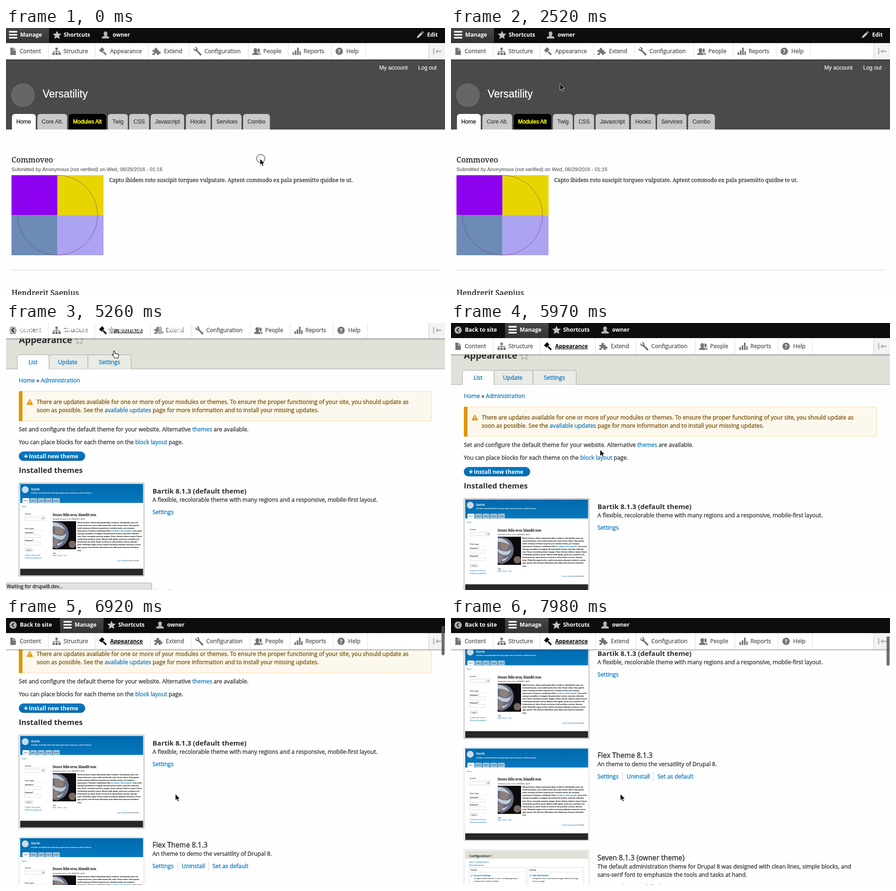
These frames come from a looping animation (959x584 px, 8000 ms). An HTML page:

```html
<!DOCTYPE html>
<html lang="en">
<head>
<meta charset="utf-8">
<title>Theme switch</title>
<style>
html, body { margin: 0; width: 100%; height: 100%; overflow: hidden; background: #fefefe; }
svg { display: block; width: 100%; height: 100%; font: 12.45px "Open Sans", "Noto Sans", sans-serif; color: #2e2e2e; fill: currentColor; }
text { white-space: pre; stroke: currentColor; stroke-width: .024em; }
tspan { stroke: currentColor; }
.b { font-weight: 700; font-size: 12px; stroke: none; }
.w { color: #fff; }
.l { color: #0072bb; }
.g { color: #505050; }
.u { text-decoration: underline; color: #000; }
.h { font-family: "Liberation Sans", Arial, sans-serif; font-size: 12.1px; stroke-width: .012em; }
.s { font-family: "Noto Serif", serif; color: #1c1c1c; stroke-width: .015em; }
.heavy { stroke-width: .05em; }
.warn { color: #734c00; }
</style>
</head>
<body>
<svg viewBox="0 0 959 584" xmlns="http://www.w3.org/2000/svg"></svg>
<script>
const ICON = {
  file: 'M0 1h6v6h6v10H0zM7 1l5 5H7z',
  tree: 'M6.5 1h5v5h-5zM0 12h5v5H0zM6.5 12h5v5h-5zM13 12h5v5h-5zM8.3 6h1.4v6H8.3zM2 8.5h14V12h-1.4v-2H3.4v2H2z',
  brush: 'M0 7 7 0l5 5-6 7zM10 8.5l7 6.5-2 3-7-7z',
  puzzle: 'M0 6h5a3 3 0 1 1 5 0h4v4a2.5 2.5 0 1 1 0 4v3H9.5a2.5 2.5 0 1 0-4 0H0v-4a2 2 0 1 0 0-3z',
  wrench: 'M1 2l4 4 2-2-4-4a5.5 5.5 0 0 1 6.5 7l8 7.5a2 2 0 0 1-3 3L7 9A5.5 5.5 0 0 1 1 2z',
  person: 'M6 9.5a4 4.8 0 1 1 6 0v2l5 2V17H1v-3.5l5-2z',
  people: 'M4 10a4 4.8 0 1 1 6 0v2l4 2v3H0v-3l4-2zM12 3a3.5 4 0 0 1 2 8l4 2v4h-2.5v-4L12 11z',
  bars: 'M0 11h3.5v6H0zM5 7h3.5v10H5zM10 1h3.5v16H10zM15 9h3v8h-3z',
  disc: 'M8.5 1a8 8 0 1 0 .01 0z',
  star: 'M9 0l2.7 6.2 6.8.6-5.1 4.5 1.5 6.7L9 14.5 3.1 18l1.5-6.7L-.5 6.8l6.8-.6z',
  pencil: 'M1 17l1.5-5 9-9L15 6.5l-9 9zM12.5 2 14.2.3l3.5 3.5L16 5.5z'
};

// markup helpers
const text = (x, y, s, cls = '', size) =>
  `<text x="${x}" y="${y}" class="${cls}"${size ? ` style="font-size:${size}px"` : ''}>${s}</text>`;
const box = (x, y, w, h, fill, more = '') =>
  `<rect x="${x}" y="${y}" width="${w}" height="${h}" fill="${fill}" ${more}/>`;
const path = (d, fill, more = '') => `<path d="${d}" fill="${fill}" ${more}/>`;
const icon = (name, x, y, fill, scale = 1) =>
  path(ICON[name], fill, `transform="translate(${x} ${y}) scale(${scale})"`);
const tint = (color, s) => `<g style="color:${color}">${s}</g>`;
const link = s => `<tspan class="l" fill="currentColor">${s}</tspan>`;
const group = (id, s, more = '') => `<g id="${id}" ${more}>${s}</g>`;
const tabPath = (x, y, w, h, r) =>
  `M${x} ${y + h}v${r - h}q0 ${-r} ${r} ${-r}h${w - 2 * r}q${r} 0 ${r} ${r}v${h - r}`;

// label, text x, icon, icon x, right edge
const MENU = [
  ['Content', 30, 'file', 9.5, 92], ['Structure', 125.5, 'tree', 101.5, 194],
  ['Appearance', 227.5, 'brush', 203, 311], ['Extend', 345, 'puzzle', 320, 400],
  ['Configuration', 433.5, 'wrench', 409, 529], ['People', 562, 'people', 538, 616],
  ['Reports', 650, 'bars', 626, 710], ['Help', 743.5, 'disc', 719.5, 785]
];

function tray(active) {
  let s = box(0, 33, 959, 36, '#fff') + box(923, 33, 36, 36, '#f3f3f3') +
    box(923, 33, 1, 36, '#ccc') +
    path('M933 44h2.5v14h-2.5zM938 51l5-5v3.5h8v3h-8V56z', '#b4b4b4') +
    box(0, 68.5, 959, 1, '#000', 'opacity=".4"') + box(0, 69.5, 959, 2, '#000', 'opacity=".14"');
  MENU.forEach(([label, x, name, ix, edge], i) => {
    const dx = active && i > 2 ? 4 : 0, on = active && i == 2;
    s += icon(name, ix + dx, 42, on ? '#000' : '#757575') +
      text(x + dx, 55, label, (on ? 'b u' : 'g') + (active ? '' : ' m' + i)) +
      box(edge + (active && i > 1 ? 4 : 0), 33, 1, 35, '#dcdcdc');
  });
  return s + text(725 + (active ? 4 : 0), 55.5, '?', 'b w');
}

const barBack = x => box(0, 0, 959, 33, '#0d0d0d') + box(x, 0, 95, 33, 'url(#tab)');
const bar = x => [7, 13.5, 20].map(y => box(x + 6.5, y - .5, 18, 3.4, '#fff', 'rx="1"')).join('') +
  text(x + 31, 19, 'Manage', 'b w') + icon('star', x + 102.5, 6, '#c4c4c4') +
  text(x + 126, 19, 'Shortcuts', 'b w') + icon('person', x + 208.5, 6, '#b4b4b4') +
  text(x + 233, 19, 'owner', 'b w');

function sitePage() {
  const tabs = [['Home', 13, 52], ['Core Alt.', 68.5, 65], ['Modules Alt', 137, 82], ['Twig', 222.5, 43.5],
    ['CSS', 269, 43.5], ['Javascript', 316, 73], ['Hooks', 393, 54], ['Services', 450, 64.5], ['Combo', 518, 58.5]];
  let s = box(0, 69, 959, 153, '#4a4a4a') + text(815.5, 91, 'My account', 'h w') +
    text(900.5, 91, 'Log out', 'h w') + '<circle cx="37" cy="147" r="26" fill="#666"/>' +
    text(80, 152, 'Versatility', 'h w', 23);
  tabs.forEach(([label, x, w], i) => {
    s += path(tabPath(x, 188, w, 34, 7), ['#fefefe', , '#000'][i] || '#c9c9c9') +
      tint(['#000', , '#ff0'][i] || '#333', text(x + 9.5, 209, label, i == 2 ? 'h heavy' : 'h'));
  });
  s += text(12, 293.5, 'Commoveo', 's', 17) +
    tint('#555', text(12, 313, 'Submitted by Anonymous (not verified) on Wed, 06/29/2016 - 01:16', 'h', 11.05)) +
    box(12, 322, 100.5, 87.5, '#8d00f0') + box(112.5, 322, 100.5, 87.5, '#e8d500') +
    box(12, 409.5, 100.5, 87.5, '#6c8bb6') + box(112.5, 409.5, 100.5, 87.5, '#aca3f1') +
    '<circle cx="112.5" cy="409.5" r="87.3" fill="none" stroke="#7a2f7c" stroke-opacity=".65"/>' +
    text(225.5, 337, 'Capto ibidem roto suscipit torqueo vulputate. Aptent commodo ex pala praemitto quidne te ut.', 's', 11.85) +
    box(12, 529, 934, 1, '#d3d3d3') + text(12, 585, 'Hendrerit Saepius', 's', 17);
  s += group('pens', [283, 307].map(y =>
    `<circle cx="929" cy="${y}" r="11.5" fill="#fff" stroke="#c4c4c4"/>` + icon('pencil', 922.5, y - 6.5, '#a8a8a8', .72)).join(''));
  return s + tray(false) + barBack(-1) + bar(0) + icon('pencil', 896.5, 6.5, '#c4c4c4', .92) + text(920, 19, 'Edit', 'b w');
}

const LOREM = `Morbi id lacus. Etiam malesuada diam ut libero. Sed blandit, justo nec
euismod laoreet, nunc nulla iaculis elit, vitae. Donec dolor. Class aptent
taciti sociosqu ad litora torquent per conubia nostra, per inceptos
hymenaeos. Vivamus vestibulum felis ${link('nec libero. Duis lobortis.')} Cum sociis
natoque penatibus et magnis dis parturient montes, nascetur ridiculus
mus. Nunc venenatis pretium magna. Donec dictum ultrices massa. Donec
vestibulum porttitor purus. Mauris nibh ligula, porta non, porttitor sed,
fermentum id, dolor. Donec eu lectus et elit porttitor rutrum. Aenean
justo. Phasellus augue tortor, mattis nonummy, aliquam euismod, cursus
eget, ipsum. Sed ultricies bibendum ante. Maecenas rhoncus tincidunt
eros.`.split('\n');

const field = (x, y, w, h = 7) => box(x, y, w, h, '#fff', 'stroke="#ccc" stroke-width=".7"');

const planet = box(74, 84, 51, 61.5, '#0b0a0d') +
  path('M74 85.500q30-3 35 24 1 26-27 34.500l-8-3z', '#676d82') +
  path('M79 92q15-2 18 10t-9 13l-9-6zM76 122l11 4-5 12-7 2z', '#8f8078') +
  path('M74 87q18 0 27 16-12-9-27-8zM75 111q18 10 29 0-4 15-15 13-10-1-15-8zM84 133q9-1 14-7-5 10-14 12z', '#c3cbd8') +
  '<circle cx="117" cy="134.5" r="8" fill="#786a61"/>';

function siteThumb() {
  const star = '<tspan fill="#e00" stroke="none">*</tspan>';
  let s = box(3, 2.5, 268.5, 41.5, 'url(#blue)') + '<circle cx="14" cy="15" r="7.5" fill="#c8dbe8"/>' +
    text(27, 16, 'Bartik', 'h w', 7.4) +
    `<g font-weight="700" font-style="italic">${text(27, 23.5, 'A flexible, recolorable theme with many regions and a responsive, mobile-first layout.', 'h w', 3.25)}</g>`;
  for (let i = 0; i < 5; i++) {
    const x = 8 + 16.6 * i;
    s += path(tabPath(x, 33.5, 15.2, 10.5, 2), i ? '#9cc4de' : '#fff') + text(x + 2.5, 40, 'Link ' + (i + 1), 'h', 3.8);
  }
  s += text(7, 53.5, 'Home', 'h l', 3.6) + text(13, 69, 'Search', 's', 4.1) + box(13, 71.5, 47, .6, '#ddd') +
    field(13, 75, 34) + field(50, 74.5, 7.5, 7.5) + '<circle cx="53.5" cy="78" r="1.5" fill="none" stroke="#333" stroke-width=".7"/>' +
    text(13, 101.5, 'User login', 's', 4.2) + box(13, 104, 47, .6, '#ddd') +
    text(13, 110.5, 'Username ' + star, 'h heavy', 3.8) + field(13, 113, 34) +
    text(13, 127, 'Password ' + star, 'h heavy', 3.8) + field(13, 129.5, 34) +
    box(13, 143.5, 18, 7, '#f1f1f1', 'rx="3" stroke="#ccc" stroke-width=".6"') + text(17, 148.5, 'Log in', 'h', 3.8) +
    text(12, 159, '• Create new account', 'h l', 3.7) + text(12, 165, '• Reset your password', 'h l', 3.7) +
    text(74, 72, 'Donec felis eros, blandit non', 's heavy', 7) +
    text(74, 80.5, 'Submitted by owner on Thu, 04/18/2013 - 04:36', 'h', 3.3) + planet +
    LOREM.map((line, i) => text(128, 88 + 6.1 * i, line, 's heavy', 4)).join('') +
    text(74, 155, 'Tags', 'h', 3.6) + text(74, 160, 'Earth   Moon   Lem', 'h l', 3.6) +
    text(214.5, 171, `${link('Log in')} or ${link('register')} to post comments`, 'h', 3.1) +
    box(3, 188, 268.5, 14.5, '#282828');
  return s;
}

function adminThumb() {
  let s = box(3, 2.5, 268.5, 17.5, '#e0e0d8') + text(12, 16, 'Configuration', 'b', 6.5) +
    path(ICON.star, 'none', 'stroke="#777" stroke-width="2" transform="translate(57 11) scale(.27)"') +
    text(12, 28, 'Home » Administration', 'l', 4) + text(12, 35, 'Hide descriptions', 'l', 4);
  [['PEOPLE', 'Account settings', 'Configure default behavior of users, including registration', 'requirements, emails, and fields.'],
   ['SYSTEM', 'Site information', 'Change site name, email address, slogan, default front page,', 'and error pages.']]
    .forEach(([head, name, one, two], i) => {
      const x = 12 + 128 * i;
      s += box(x, 39, 124 - 2 * i, 160, '#fff', 'stroke="#ccc" stroke-width=".7"') + text(x + 3, 46, head, 'b', 3.9) +
        box(x + 3, 49, 117, .6, '#ccc') +
        `<circle cx="${x + 5.5}" cy="57" r="1.7" fill="none" stroke="#0074bd" stroke-width=".7"/>` +
        text(x + 10, 58.5, name, 'b l', 4.4) + text(x + 10, 64.5, one, '', 3.6) + text(x + 10, 70.5, two, '', 3.6);
    });
  return s;
}

function card(i, thumb, title, lines, links) {
  let s = box(.5, .5, 273, 203.5, '#fff', `stroke="${i ? '#d0d0d0' : '#8c8c8c'}"`) + thumb +
    text(292, 23, title, i ? '' : 'b', i ? 15.4 : 15);
  lines.forEach((line, j) => s += text(292, 41 + 18 * j, line));
  const y = 50 + 18 * lines.length;
  links.forEach(([label, x], j) => {
    s += text(x, y, label, 'l') + (j ? box(x - 9.5, y - 14, 1, 19, '#ccc') : '');
  });
  return `<g transform="translate(28 ${349.5 + 223.5 * i})">${s}</g>`;
}

function adminBody() {
  const edge = 'stroke="#a6a6a0"', set = ['Settings', 292];
  return box(0, -60, 959, 160.5, '#e0e0d8') + box(0, 100, 959, 1, '#a6a6a0') +
    text(28, 44, 'Appearance', 'b', 19.6) +
    path(ICON.star, 'none', 'stroke="#777" transform="translate(152 29) scale(.92)"') +
    path(tabPath(94, 69.5, 85, 31, 3), '#ebebe5', edge) + path(tabPath(179, 69.5, 94.5, 31, 3), '#ebebe5', edge) +
    path(tabPath(25, 69.5, 69, 32, 4), '#fefefe', edge) +
    text(49, 90, 'List', 'l') + text(113.5, 90, 'Update', 'l') + text(203, 90, 'Settings', 'l') +
    text(28, 130, `${link('Home')} » ${link('Administration')}`) +
    box(28.5, 149.5, 901, 64.5, '#fdf8ed', 'stroke="#f4daa6" rx="2"') + box(28, 149, 8, 65.5, '#e09600') +
    path('M52 166.5l6.5 12h-13z', '#e09600', 'stroke="#e09600" stroke-linejoin="round"') +
    box(51.2, 170, 1.6, 4.5, '#fff') + box(51.2, 175.5, 1.6, 1.6, '#fff') +
    text(67, 177, 'There are updates available for one or more of your modules or themes. To ensure the proper functioning of your site, you should update as', 'warn') +
    text(67, 195, `soon as possible. See the ${link('available updates')} page for more information and to install your missing updates.`, 'warn') +
    text(28, 237, `Set and configure the default theme for your website. Alternative ${link('themes')} are available.`) +
    text(28, 264.5, `You can place blocks for each theme on the ${link('block layout')} page.`) +
    box(28.5, 281.5, 144, 19.5, 'url(#btn)', 'rx="9.7" stroke="#1e5c90"') +
    path('M42.5 287.5h2v3h3v2h-3v3h-2v-3h-3v-2h3z', '#fff') + text(50, 296, 'Install new theme', 'b w') +
    text(28, 327.5, 'Installed themes', 'b', 16.7) +
    card(0, siteThumb(), 'Bartik 8.1.3 (default theme)',
      ['A flexible, recolorable theme with many regions and a responsive, mobile-first layout.'], [set]) +
    card(1, siteThumb(), 'Flex Theme 8.1.3', ['An theme to demo the versatility of Drupal 8.'],
      [set, ['Uninstall', 356], ['Set as default', 423]]) +
    card(2, adminThumb(), 'Seven 8.1.3 (owner theme)',
      ['The default administration theme for Drupal 8 was designed with clean lines, simple blocks, and',
       'sans-serif font to emphasize the tools and tasks at hand.'], [set, ['Set as default', 356]]);
}

const grad = (id, a, b) => `<linearGradient id="${id}" x2="0" y2="1"><stop stop-color="${a}"/><stop offset="1" stop-color="${b}"/></linearGradient>`;

document.querySelector('svg').innerHTML =
  grad('tab', '#484848', '#333') + grad('blue', '#0069ad', '#0778be') + grad('btn', '#007bc6', '#0069ae') +
  box(0, 0, 959, 584, '#fefefe') + group('site', sitePage()) +
  group('panel', group('page', adminBody()) + group('tray', tray(true)) + group('barBack', barBack(118)) +
    '<circle cx="15.5" cy="15.5" r="8" fill="#b0b0b0"/>' +
    path('M17.5 11 13 15.5l4.5 4.5', 'none', 'stroke="#222" stroke-width="2.2"') +
    text(30.5, 19, 'Back to site', 'b w') + bar(119)) +
  group('thumb', box(951.5, 0, 6.5, 64, '#555', 'rx="3.2" opacity=".85"')) +
  group('status', path('M-1 585V568.5H315q3.5 0 3.5 3.5V585z', '#e2e2e2', 'stroke="#a8a8a8"') +
    '<text id="note" x="1.5" y="580" style="font-size:10.5px;color:#111"></text>') +
  group('cursor', '<circle id="ring" cx="1.5" cy="-.5" r="9" fill="none" stroke="#111"/>' +
    group('arrow', path('M0 0V14l3.3-3 2.2 5.2 2.4-1L5.7 10.2H10z', '#000', 'stroke="#fff" stroke-width=".8"')) +
    group('hand', path('M-2 .8Q-1.5-1.2.3.3L1.5 5.5 3 5l1.5.8 1.6-.2 1 1 1.3.2.8 1.4-.5 4-1.2 3H.5L-1.5 12l-3.3-4.2q.4-1.6 2.6.2z',
      '#fff', 'stroke="#000" stroke-width="1.1" stroke-linejoin="round"')));

const $ = id => document.getElementById(id);
const show = (id, on) => $(id).style.display = on ? '' : 'none';
const shift = (id, x, y) => $(id).setAttribute('transform', `translate(${x} ${y})`);

// start, end, number of steps, target x, y
const MOVES = [[1230, 1230, 1, 520.5, 295], [1340, 1690, 4, 408, 302], [2050, 2750, 7, 170, 50],
  [3230, 3350, 2, 275, 45], [3710, 3710, 1, 237, 61.5], [5620, 6210, 6, 370, 385]];
const SCROLL = [4, 18.5, 63, 128, 180, 218, 246.5, 270, 287, 300, 311, 319, 324];

const stepped = (t, a, b, n) => t < a ? 0 : Math.min(1, (Math.floor((n - 1) * (t - a) / (b - a || 1) + .05) + 1) / n);

function draw(t) {
  let x = 555, y = 286;
  for (const [a, b, n, tx, ty] of MOVES) {
    const p = stepped(t, a, b, n);
    x += (tx - x) * p;
    y += (ty - y) * p;
  }
  const hand = t >= 2745 && t < 5620, ready = t >= 5380, scrolling = t >= 6570;
  const s = scrolling ? SCROLL[Math.min(12, Math.floor((t - 6570) / 117.5 + .07))] : 0;
  shift('cursor', x, y);
  show('hand', hand);
  show('arrow', !hand);
  show('ring', t < 120 || t >= 3710 && t < 3830);

  show('site', t < 5260);
  show('pens', t >= 1230 && y > 271);
  document.querySelector('.m1').classList.toggle('u', hand && t < 3230);
  document.querySelector('.m2').classList.toggle('u', t >= 3230);

  show('panel', t >= 5260);
  show('barBack', ready);
  shift('tray', 0, ready ? 0 : -35);
  shift('page', 0, ready ? 34 - s : 0);
  show('thumb', scrolling);
  shift('thumb', 0, 2.5 + .1165 * s);

  show('status', hand);
  $('note').textContent = t >= 3830 ? 'Waiting for drupal8.dev...' :
    'drupal8.dev/owner/' + (t < 3230 ? 'structure' : 'appearance');
}

(function loop() {
  draw(performance.now() % 8000);
  requestAnimationFrame(loop);
})();
</script>
</body>
</html>
```
